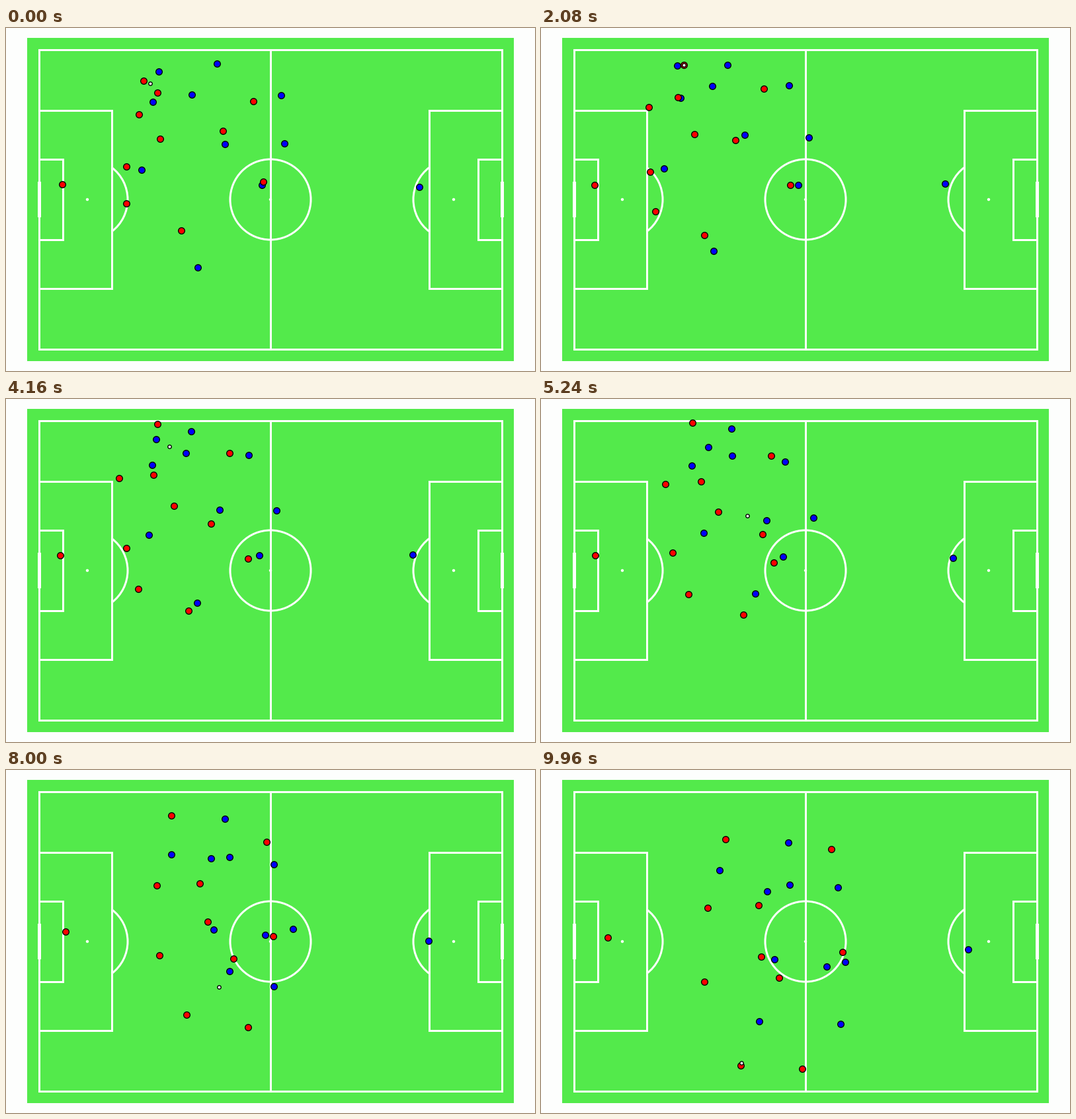
These frames come from a looping animation (800x520 px, 10 s). A matplotlib script:

```python
import numpy as np
import matplotlib.pyplot as plt
from matplotlib.animation import FuncAnimation
from matplotlib.patches import Arc, Circle, Rectangle

W, H, DPI = 800, 520, 100
FRAMES, STEP = 250, 40
GRASS, PAPER = "#53ea4b", "#fdfefd"
RED, BLUE = "#ff0000", "#0000ff"
PX = 72 / DPI
HALF = 0.5  # centre of a pixel
MID_X, MID_Y = 400, 260
RING = 61   # radius of the centre circle and penalty arcs

fig = plt.figure(figsize=(W / DPI, H / DPI), dpi=DPI, facecolor=PAPER)
ax = fig.add_axes([0, 0, 1, 1])
ax.set_xlim(0, W)
ax.set_ylim(H, 0)
ax.axis("off")


# --- pitch ---

def bar(x0, y0, x1, y1, width=3):
    """Straight white line with square ends on whole pixels."""
    r = width // 2
    x0, x1 = sorted((x0, x1))
    ax.add_patch(Rectangle((x0 - r, y0 - r), x1 - x0 + width, y1 - y0 + width,
                           fc="white", lw=0, zorder=1))


def box(x0, y0, x1, y1):
    for y in (y0, y1):
        bar(x0, y, x1, y)
    for x in (x0, x1):
        bar(x, y0, x, y1)


def spot(x):
    ax.add_patch(Circle((x, MID_Y), 2.2, fc="white", lw=0, zorder=1))


def ring(x, start=0, end=360):
    ax.add_patch(Arc((x, MID_Y), 2 * RING, 2 * RING, theta1=start, theta2=end,
                     color="white", lw=3 * PX, zorder=1))


ax.add_patch(Rectangle((32, 15), 736, 490, fc=GRASS, lw=0, zorder=0))
box(50, 33, 750, 487)
bar(MID_X, 33, MID_X, 487)
ring(MID_X)
spot(MID_X)
for side in (-1, 1):
    goal = MID_X + 350 * side
    box(goal, 125, goal - 110 * side, 395)
    box(goal, 199, goal - 36 * side, 321)
    bar(goal, 235, goal, 284, 5)
    facing = 90 + 90 * side
    ring(MID_X + 277 * side, facing - 53, facing + 53)
    spot(MID_X + 277 * side)


# --- players ---

times = np.arange(FRAMES) * STEP
knots = np.array([0, 3000, 6720, 9960])


def bump(start, end):
    """Soft rise and fall between two moments."""
    u = np.clip((times - start) / (end - start), 0, 1)
    return np.sin(np.pi * u) ** 2


# Both teams drift together: first towards the left goal, then up the pitch.
sway = np.column_stack([-9 * bump(0, 3000), -8 * bump(3000, 6720)])


def smooth(points):
    """Cubic Hermite curve through one point per knot."""
    p = np.array(points, float)
    slope = np.gradient(p, knots, axis=0)
    i = np.clip(np.searchsorted(knots, times, "right") - 1, 0, len(knots) - 2)
    h = (knots[i + 1] - knots[i])[:, None]
    u = (times - knots[i])[:, None] / h
    ease = u * u * (3 - 2 * u)
    return (p[i] + (p[i + 1] - p[i]) * ease
            + h * u * (1 - u) * ((1 - u) * slope[i] - u * slope[i + 1]))


movers = []


def add_disc(path, color, radius, z):
    disc = Circle((0, 0), radius, fc=color, ec="black", lw=1.4 * PX, zorder=z)
    ax.add_patch(disc)
    movers.append((disc, np.round(path) + HALF))


def player(color, *points, drift=1):
    path = smooth(points) + drift * sway
    add_disc(path, color, 4.8, 3 if color == RED else 2)
    return path


def keeper(color, *points):
    return player(color, *points, drift=0.3)


keeper(BLUE, (625, 241), (611, 235), (634, 251), (646, 272))
player(BLUE, (231, 66), (211, 58), (288, 105), (342, 184))
player(BLUE, (222, 112), (217, 105), (239, 116), (270, 152))
player(BLUE, (281, 101), (263, 85), (315, 109), (376, 174))
player(BLUE, (319, 54), (280, 57), (307, 56), (374, 110))
player(BLUE, (416, 102), (371, 85), (382, 122), (449, 178))
player(BLUE, (421, 175), (409, 166), (421, 212), (460, 291))
player(BLUE, (331, 176), (313, 162), (368, 221), (432, 298))
player(BLUE, (205, 215), (195, 213), (287, 219), (353, 287))
player(BLUE, (387, 238), (394, 240), (346, 266), (330, 381))
player(BLUE, (290, 363), (267, 328), (372, 302), (453, 385))

keeper(RED, (85, 237), (82, 238), (84, 241), (101, 254))
winger = player(RED, (208, 80), (227, 48), (235, 51), (279, 105))
player(RED, (229, 98), (212, 110), (270, 152), (329, 205))
player(RED, (201, 131), (163, 119), (212, 155), (252, 209))
player(RED, (233, 168), (243, 161), (288, 201), (333, 283))
player(RED, (328, 156), (297, 179), (372, 235), (456, 276))
player(RED, (374, 111), (336, 87), (369, 102), (439, 120))
player(RED, (182, 210), (171, 223), (220, 258), (247, 321))
back = player(RED, (182, 266), (183, 285), (253, 329), (302, 448))
player(RED, (265, 307), (256, 319), (344, 356), (395, 453))
striker = player(RED, (389, 233), (378, 241), (340, 269), (360, 315))


# --- ball ---

ball = np.zeros((FRAMES, 2))


def carry(path, start, end, gap0, gap1):
    """Keep the ball at a player's feet, the gap changing evenly."""
    i, j = start // STEP, end // STEP + 1
    ball[i:j] = path[i:j] + np.linspace(gap0, gap1, j - i)


def kick(start, end, via_time, via):
    """Roll the ball between two carries through a point on the way."""
    i, m, j = start // STEP, via_time // STEP, end // STEP
    ball[i:m + 1] = np.linspace(ball[i], via, m - i + 1)
    ball[m:j + 1] = np.linspace(via, ball[j], j - m + 1)


carry(winger, 0, 1120, (10, 4), (0, 0))
carry(winger, 1120, 3840, (0, 0), (-1, 0))
carry(striker, 6280, 7360, (0, -2), (2, 2))
carry(back, 9280, 9960, (5, 0), (1, -4))
kick(3840, 6280, 5240, (312, 177))
kick(7360, 9280, 8000, (322, 329))
add_disc(ball, "white", 2.7, 4)


def draw(frame):
    for disc, path in movers:
        disc.center = path[frame]
    return [disc for disc, _ in movers]


anim = FuncAnimation(fig, draw, frames=FRAMES, interval=STEP,
                     repeat=True, repeat_delay=0, blit=False)
plt.show()
```
